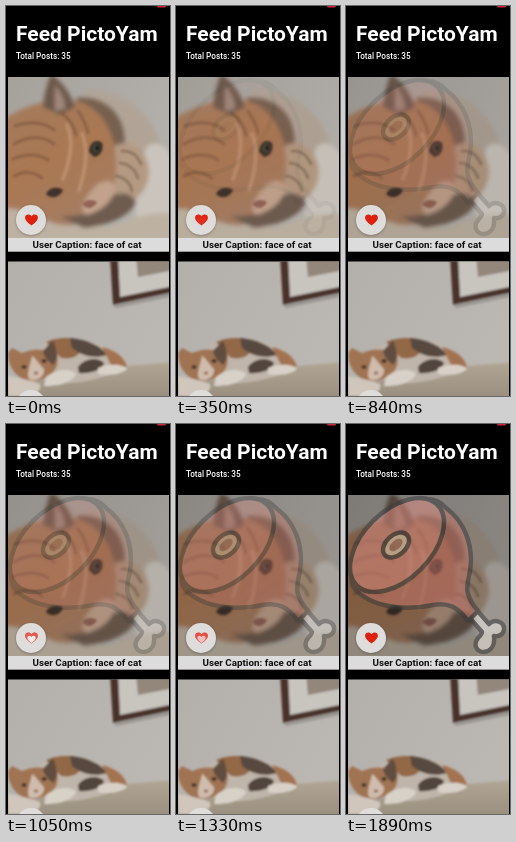
These frames come from a looping animation (164 px wide and 390 px high, 1.96 s). An HTML page:

```html
<!DOCTYPE html>
<html lang="en">
<head>
<meta charset="utf-8">
<title>Photo feed</title>
<style>
html, body { margin: 0; width: 100%; height: 100%; overflow: hidden; background: #000; }
svg { display: block; width: 100vw; height: 100vh; }
text { font-family: Roboto, sans-serif; }
</style>
</head>
<body>
<svg viewBox="0 0 164 390" xmlns="http://www.w3.org/2000/svg">
  <defs>
    <clipPath id="top"><rect x="2" y="71" width="161" height="174.500"/></clipPath>
    <clipPath id="low"><rect x="2" y="255.500" width="161" height="134.500"/></clipPath>
    <filter id="soft" x="-20%" y="-20%" width="140%" height="140%"><feGaussianBlur stdDeviation="2.2"/></filter>
    <filter id="fine" x="-20%" y="-20%" width="140%" height="140%"><feGaussianBlur stdDeviation="0.8"/></filter>
    <linearGradient id="wall" x1="0" y1="0" x2="1" y2="0.6">
      <stop offset="0" stop-color="#a5a19b"/><stop offset="1" stop-color="#b5b1ac"/>
    </linearGradient>
    <linearGradient id="wall2" x1="0" y1="0" x2="1" y2="0.5">
      <stop offset="0" stop-color="#b3b0ac"/><stop offset="1" stop-color="#bbb7b2"/>
    </linearGradient>
    <linearGradient id="fur" x1="0" y1="0" x2="0.5" y2="1">
      <stop offset="0" stop-color="#a27b5e"/><stop offset="0.55" stop-color="#aa7852"/><stop offset="1" stop-color="#a57c61"/>
    </linearGradient>
    <linearGradient id="rug" x1="0" y1="0" x2="0" y2="1">
      <stop offset="0" stop-color="#b1a694"/><stop offset="1" stop-color="#988d7d"/>
    </linearGradient>
    <path id="heart" d="M0 5.800 C-3.200 3 -6.400 0.700 -6.400 -2.100 C-6.400 -5.800 -1.800 -6.400 0 -3.500 C1.800 -6.400 6.400 -5.800 6.400 -2.100 C6.400 0.700 3.200 3 0 5.800Z"/>
  </defs>

  <rect width="164" height="390"/>
  <rect x="151" y="-2" width="9" height="3.500" rx="1.500" fill="#d3243c"/>
  <text x="10" y="35" font-size="21" font-weight="700" fill="#fff">Feed PictoYam</text>
  <text x="10" y="53" font-size="8.2" font-weight="500" fill="#fff">Total Posts: 35</text>

  <g clip-path="url(#top)">
    <rect x="2" y="71" width="161" height="175" fill="url(#wall)"/>
    <g filter="url(#soft)">
      <path d="M76 86 C108 80 140 100 152 132 C160 158 150 182 126 194 L96 175Z" fill="#b1a497"/>
      <path d="M70 92 C90 88 112 101 117 121 C122 140 118 152 108 162 L86 130Z" fill="#776150"/>
      <path d="M140 142 C150 132 160 140 168 154 L168 236 L130 236 C128 205 132 170 140 142Z" fill="#cac4bc"/>
      <path d="M108 140 C128 130 142 146 143 166 C142 184 132 194 117 199 L100 178Z" fill="#b49a82"/>
      <path d="M-4 114 C12 104 24 99 38 96 L60 94 C82 93 100 110 107 134 C113 157 111 179 100 200 C90 216 70 221 48 219 L-4 213Z" fill="url(#fur)"/>
      <path d="M37 101 C38 88 41 78 45 68 C55 75 64 86 69 101 L54 109Z" fill="#6d584c"/>
      <path d="M49 79 C55 86 59 94 59 103 L49 105Z" fill="#a1887b"/>
      <path d="M-4 204 C12 198 24 212 42 215 C58 223 82 217 100 222 C122 214 140 205 168 208 L168 250 L-4 250Z" fill="#bdb1a1"/>
      <path d="M54 210 C76 212 93 205 105 190 C118 185 127 188 130 197 C122 211 104 219 78 222Z" fill="#6e5c4f"/>
      <path d="M86 184 C94 174 105 172 109 180 C109 193 98 204 81 209 C73 207 77 194 86 184Z" fill="#c2a28c"/>
    </g>
    <g filter="url(#fine)" fill="none" stroke-linecap="round">
      <path d="M9 120 C24 115 38 116 48 124 M8 138 C24 129 38 130 48 138 M7 153 C20 147 33 148 42 154 M8 170 C18 164 28 166 36 172 M56 107 C63 113 68 119 70 129 M72 105 C77 112 80 118 82 127" stroke="#795039" stroke-width="3" opacity=".55"/>
      <path d="M61 119 C68 135 64 155 57 173 M76 128 C82 142 81 160 73 184" stroke="#c29676" stroke-width="4" opacity=".7"/>
      <path d="M116 145 C126 144 132 151 135 158 M114 157 C124 158 130 165 132 172 M110 170 C119 171 125 178 126 185" stroke="#826c59" stroke-width="3" opacity=".7"/>
    </g>
    <g filter="url(#fine)">
      <path d="M83 146 C83 137 90 132 96 137 C98 143 95 150 88 151Z" fill="#3a3028"/>
      <ellipse cx="90.500" cy="142" rx="3" ry="4" fill="#4d5248"/>
      <ellipse cx="91" cy="142" rx="2" ry="3" fill="#1d1b18"/>
      <path d="M40 188 C43 181 52 180 57 184 C54 191 46 194 40 188Z" fill="#40322a"/>
      <path d="M76 198 C80 193 87 193 91 196 C88 202 82 205 76 198Z" fill="#936457"/>
    </g>
    <rect id="dim" x="2" y="71" width="161" height="175" opacity="0"/>
    <g id="ham" opacity="0" stroke="#37393b" stroke-width="4.500" stroke-linejoin="round">
      <path d="M122 192 L129 184 L143 200 C149 194 159 198 158 206 C157 211 152 213 148 212 C149 220 146 227 138 228 C130 228 127 220 132 214 C134 212 136 210 136 208Z" fill="#f4f2ee"/>
      <path d="M8 164 C-2 148 18 108 50 86 C70 73 90 71 100 84 C118 97 128 121 124 147 C121 162 117 169 132 187 L122 197 C112 183 102 178 87 181 C60 187 25 184 8 164Z" fill="#c5746b"/>
      <ellipse cx="51" cy="121" rx="57" ry="34" transform="rotate(-45 51 121)" fill="#df8d83"/>
      <ellipse cx="50" cy="121" rx="15" ry="10" transform="rotate(-42 50 121)" fill="#e6dac0"/>
      <ellipse cx="50" cy="121" rx="8" ry="4.500" transform="rotate(-42 50 121)" fill="#a8776a" stroke="none"/>
    </g>
    <rect x="2" y="232" width="161" height="13.500" fill="#dcdcdc"/>
  </g>
  <text x="81" y="242" font-size="9.8" font-weight="700" text-anchor="middle" fill="#101010">User Caption: face of cat</text>
  <circle cx="25" cy="214.700" r="15.500" fill="#000" opacity=".2" filter="url(#fine)"/>
  <circle cx="25" cy="214" r="15" fill="#dfdddb"/>
  <g transform="translate(25.500 213.800)">
    <use href="#heart" fill="#e0200f"/>
    <g id="flash" opacity="0">
      <use href="#heart" fill="#f0a0a0" opacity=".45"/>
      <use href="#heart" transform="translate(0 1.500) scale(.65)" fill="#f3eaea"/>
    </g>
  </g>

  <g clip-path="url(#low)">
    <rect x="2" y="255" width="161" height="135" fill="url(#wall2)"/>
    <g filter="url(#fine)">
      <path d="M104 250 L107 299 L168 286 L168 250Z" fill="#49302a"/>
      <path d="M112 250 L114 291 L168 280 L168 250Z" fill="#c8c4be"/>
      <path d="M130 250 L132 271 L168 264 L168 250Z" fill="#93877c"/>
      <path d="M107 299 L168 286 L168 290 L110 302Z" fill="#9a9590"/>
    </g>
    <g filter="url(#fine)">
      <path d="M-4 378 L60 372 L108 361 L168 356 L168 395 L-4 395Z" fill="url(#rug)"/>
      <path d="M30 344 C44 330 66 330 82 335 C104 339 119 350 121 362 C100 371 72 380 48 376Z" fill="#bfb5aa"/>
      <path d="M40 336 C54 330 70 331 78 337 C76 350 66 354 55 352Z" fill="#926746"/>
      <path d="M64 332 C82 333 96 341 101 349 C88 353 76 350 66 342Z" fill="#584a40"/>
      <path d="M96 341 C110 344 119 352 121 361 L106 361Z" fill="#a37351"/>
      <path d="M72 361 C78 353 91 350 98 357 C96 365 82 368 73 367Z" fill="#51443c"/>
      <path d="M2 347 L6 342 L16 347 C25 343 33 343 40 344 L47 333 C51 342 53 350 51 360 C46 372 32 377 19 374 C9 370 2 360 2 347Z" fill="#a07352"/>
      <path d="M37 345 L47 334 C52 345 52 354 47 359 C42 355 38 351 37 345Z" fill="#604d40"/>
      <path d="M26 350 C30 352 31 356 38 363 C39 371 31 376 23 373 C20 367 25 357 26 350Z" fill="#cfbcac"/>
      <path d="M40 371 C54 360 70 364 70 369 C64 378 50 380 38 380Z" fill="#d8d1c8"/>
      <path d="M2 370 C12 372 24 374 34 378 C36 386 28 390 14 390 L2 390Z" fill="#d0c6bb"/>
      <path d="M92 362 C104 357 117 358 121 363 C114 369 101 370 92 368Z" fill="#d9d1c8"/>
      <ellipse cx="18" cy="361" rx="2.500" ry="1.700" fill="#2e2822"/>
      <ellipse cx="38" cy="355" rx="2.500" ry="1.800" fill="#29231e"/>
      <ellipse cx="30" cy="367" rx="2.200" ry="1.500" fill="#95675a"/>
    </g>
    <circle cx="25" cy="399" r="15" fill="#dfdddb"/>
  </g>
</svg>
<script>
const LOOP = 1960, STEP = 70;
// Each tap on the heart: start time, flash strength, overlay opacity it reaches
const taps = [
  { at: 280, flash: 0.3, level: 0.1 },
  { at: 700, flash: 0.9, level: 0.2 },
  { at: 1050, flash: 1, level: 0.32 },
  { at: 1330, flash: 0.8, level: 0.42 },
  { at: 1610, flash: 0.4, level: 0.52 }
];
const el = id => document.getElementById(id);
const ham = el('ham'), dim = el('dim'), flash = el('flash');
const clamp = v => Math.max(0, Math.min(1, v));

function draw(ms) {
  const t = Math.floor((ms % LOOP) / STEP) * STEP;
  let level = 0, glow = 0;
  for (const tap of taps) {
    const dt = t - tap.at;
    if (dt < 0) break;
    level += (tap.level - level) * clamp((dt + STEP) / 280);
    glow = tap.flash * clamp(1 - dt / 90);
  }
  ham.setAttribute('opacity', level);
  dim.setAttribute('opacity', level * 0.45);
  flash.setAttribute('opacity', glow);
}

let start;
function tick(now) {
  start ??= now;
  draw(now - start);
  requestAnimationFrame(tick);
}
draw(0);
requestAnimationFrame(tick);
</script>
</body>
</html>
```
